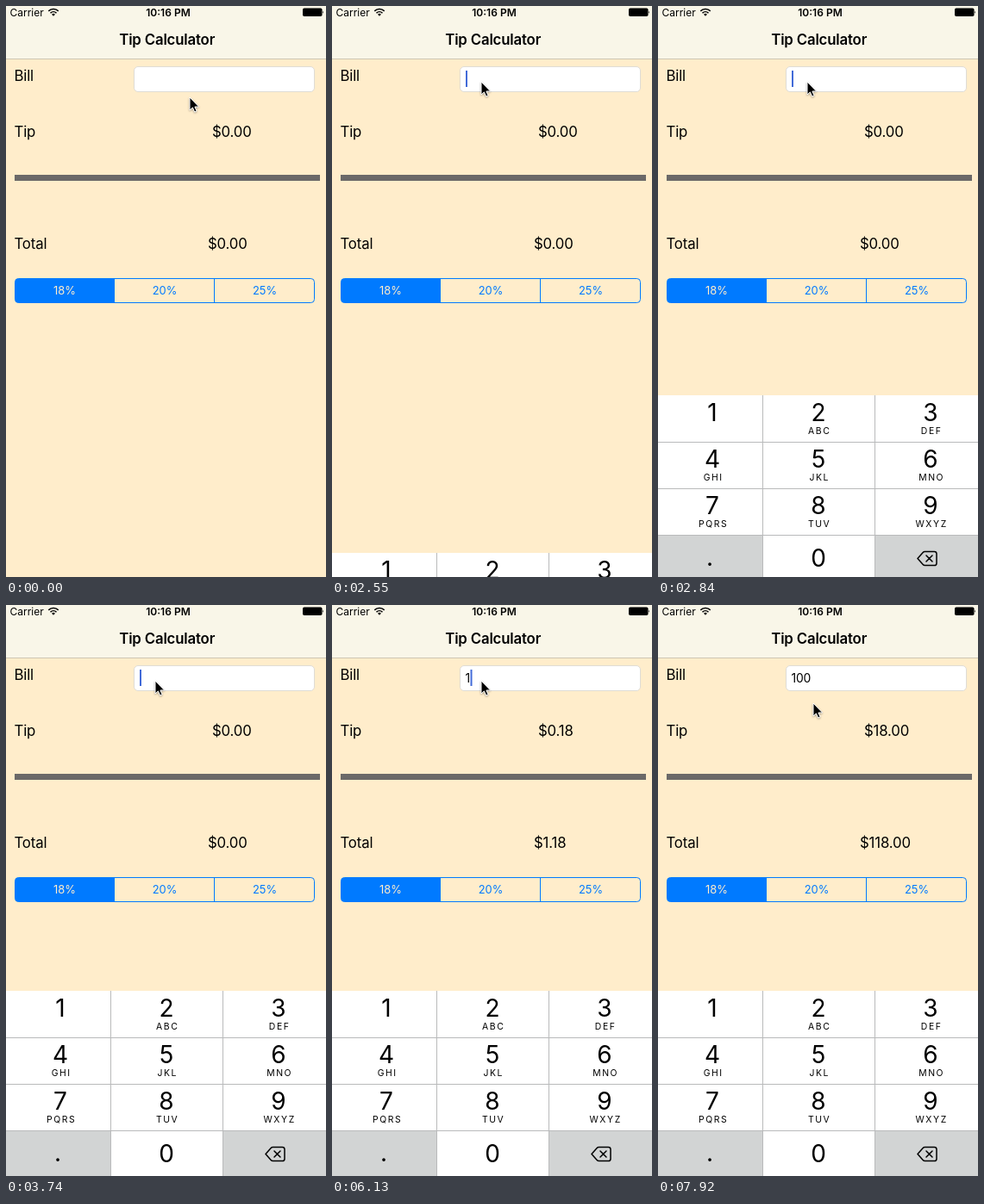
Animation of 371x663 px, one loop 8000 ms. Source, as an HTML page:

```html
<!DOCTYPE html>
<html lang="en">
<head>
<meta charset="utf-8">
<title>Tip Calculator</title>
<style>
  html, body { margin: 0; width: 100%; height: 100%; overflow: hidden; background: #ffedcb; }
  svg { display: block; font-family: Inter, Roboto, sans-serif; font-size: 16.8px; letter-spacing: -.01em; }
  .status { font-size: 12px; letter-spacing: 0; }
  .bold { font-weight: 600; }
  .mid { text-anchor: middle; }
  .segments { font-size: 12.9px; letter-spacing: 0; fill: #007aff; }
  .digit { font-size: 28px; letter-spacing: 0; text-anchor: middle; }
  .letters { font-size: 10.4px; letter-spacing: 1.6px; text-anchor: middle; }
  .line { fill: none; stroke: #000; }
</style>
</head>
<body>
<svg width="371" height="663" viewBox="0 0 371 663">
  <rect width="371" height="663" fill="#ffedcb"/>
  <rect width="371" height="61" fill="#f9f6e8"/>
  <rect y="61" width="371" height="1" fill="#cdc6b3"/>

  <text class="status" x="4.5" y="11.5">Carrier</text>
  <path class="line" stroke-width="1.6" d="M49.3 5.9a8.1 8.1 0 0 1 11.4 0M51.5 8.2a5 5 0 0 1 7 0"/>
  <path d="M53.1 9.8a2.7 2.7 0 0 1 3.8 0L55 11.8Z"/>
  <text class="status bold mid" x="188" y="11.5">10:16 PM</text>
  <rect x="344" y="2.5" width="22.5" height="9.5" rx="1.8"/>
  <path d="M367.2 5.5q1.6 1.7 0 3.5Z"/>
  <text class="bold mid" x="186.7" y="45">Tip Calculator</text>

  <text x="9.5" y="86.5">Bill</text>
  <text x="9.5" y="151.5">Tip</text>
  <text x="9.5" y="281.5">Total</text>
  <rect x="148.5" y="70.5" width="209" height="29" rx="4.5" fill="#fff" stroke="#dfdcd5"/>
  <text id="bill" x="154.5" y="90" font-size="13.9"></text>
  <rect id="caret" y="75" width="2" height="19" fill="#426bd8"/>
  <text id="tip" x="239" y="151.5"></text>
  <rect x="10" y="196" width="354" height="7" fill="#6b6968"/>
  <text id="total" x="234" y="281.5"></text>

  <g class="segments mid">
    <path d="M125.5 316.5H14.5a4 4 0 0 0-4 4v20a4 4 0 0 0 4 4h111Z"/>
    <rect x="10.5" y="316.5" width="347" height="28" rx="4" fill="none" stroke="#007aff"/>
    <path d="M125.5 316.5v28M241.5 316.5v28" stroke="#007aff"/>
    <text x="68" y="335.2" fill="#ffedcb">18%</text>
    <text x="184" y="335.2">20%</text>
    <text x="300" y="335.2">25%</text>
  </g>

  <g id="keyboard">
    <rect width="371" height="216" fill="#fff"/>
    <path d="M0 162h121v54H0ZM251 162h120v54H251Z" fill="#d2d4d4"/>
    <path d="M0 54.5h371M0 108.5h371M0 162.5h371M121.5 0v216M251.5 0v216" stroke="#b9babb"/>
    <g id="keys"></g>
    <path class="line" stroke-width="1.5" stroke-linejoin="round" stroke-linecap="round"
      d="M301 189.5l6.2-7q.9-1 2.2-1h11q2.6 0 2.6 2.6v10.8q0 2.6-2.6 2.6h-11q-1.3 0-2.2-1ZM311 186l7 7M318 186l-7 7"/>
  </g>

  <path id="pointer" d="M0 0V15L3.4 11.9 5.7 17.1 8.1 16 5.9 11H10.6Z" stroke="#fff"
    style="filter: drop-shadow(0 1px 1px #0005)"/>
</svg>
<script>
const $ = id => document.getElementById(id);

const columns = [63, 186, 316];
const letters = ['', 'ABC', 'DEF', 'GHI', 'JKL', 'MNO', 'PQRS', 'TUV', 'WXYZ'];
const label = (kind, x, y, text) => `<text class="${kind}" x="${x}" y="${y}">${text}</text>`;
$('keys').innerHTML = letters.map((group, i) => {
  const x = columns[i % 3], y = 54 * Math.floor(i / 3);
  return label('digit', x, y + 30, i + 1) + label('letters', x + 1.2, y + 45, group);
}).join('') + label('digit', 60, 198, '.') + label('digit', 186, 199, 0);

// Each track holds its value until the next [time, ...values] entry.
const pointer = [[0, 213, 106], [150, 205, 102], [300, 187, 90], [450, 178, 82],
  [900, 176, 84], [1050, 174, 87], [1200, 173, 88], [7770, 175, 97], [7920, 180, 114]];
const keyboardTop = [[0, 663], [2550, 635], [2690, 496], [2840, 452], [2990, 448]];
const bill = [[0, ''], [6130, '1'], [7030, '10'], [7170, '100']];
const caretX = [[0, 155], [6130, 160.5], [7030, 170], [7170, 178.5]];
const caretAlpha = [[0, 0], [2550, 1], [3140, .5], [3290, 0], [3590, .5], [3740, 1],
  [4190, .5], [4340, 0], [4640, 1], [5530, .5], [5680, 0], [5980, 1],
  [6730, 0], [7030, 1], [7770, 0]];

const at = (track, t) => track.findLast(step => step[0] <= t).slice(1);
const dollars = value => '$' + value.toFixed(2);

function draw() {
  const t = performance.now() % 8000;
  const [amount] = at(bill, t);
  $('bill').textContent = amount;
  $('tip').textContent = dollars(amount * .18);
  $('total').textContent = dollars(amount * 1.18);
  $('caret').setAttribute('x', at(caretX, t));
  $('caret').setAttribute('opacity', at(caretAlpha, t));
  $('keyboard').setAttribute('transform', `translate(0 ${at(keyboardTop, t)})`);
  $('pointer').setAttribute('transform', `translate(${at(pointer, t)})`);
  requestAnimationFrame(draw);
}
draw();
</script>
</body>
</html>
```
